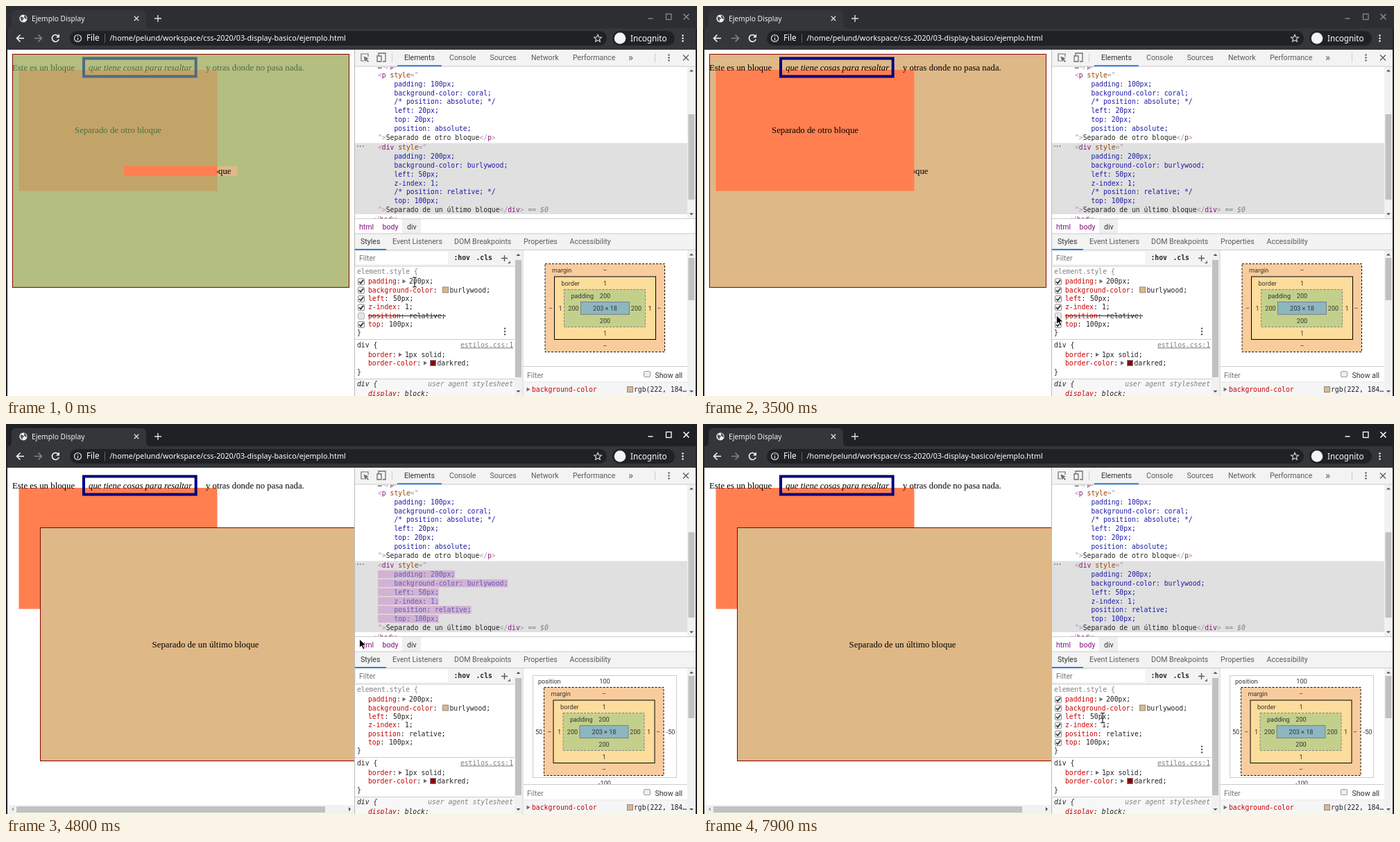
Write an HTML page that moves like this. It is 996x562 px and loops after 8 s.

```html
<!DOCTYPE html>
<html lang="es">
<head>
<meta charset="utf-8">
<title>Ejemplo Display</title>
<style>
html, body { margin: 0; width: 100%; height: 100%; overflow: hidden; background: #fff; }
svg { display: block; width: 100vw; height: 100vh; }
text { white-space: pre; }
.ui { font-family: "Noto Sans", "Open Sans", sans-serif; fill: #fff; }
.page { font: 12.83px "Liberation Serif", serif; fill: #000; }
.tool { font: 10.6px Roboto, sans-serif; fill: #5a5a5a; }
.box { font: 9.1px Roboto, sans-serif; fill: #333; }
.mid { text-anchor: middle; }
.end { text-anchor: end; }
.code { font: 9.72px "DejaVu Sans Mono", monospace; fill: #222; }
.it { font-style: italic; }
.bold { font-weight: bold; }
.tag { fill: #881280; }
.attr { fill: #994500; }
.val { fill: #1a1aa6; }
.dim { fill: #a894a6; }
.grey { fill: #808080; }
.prop { fill: #c80000; }
.line { fill: none; stroke-width: 1.5; }
</style>
</head>
<body>
<svg id="stage" viewBox="0 0 996 562" preserveAspectRatio="none"></svg>
<script>
const text = (x, y, s, cls, extra = '') => `<text x="${x}" y="${y}" class="${cls}" ${extra}>${s}</text>`;
const span = (cls, s) => `<tspan class="${cls}">${s}</tspan>`;
const rect = (x, y, w, h, fill, extra = '') => `<rect x="${x}" y="${y}" width="${w}" height="${h}" fill="${fill}" ${extra}/>`;
const frame = (x, y, w, h, fill, stroke, extra = '') =>
  rect(x + .5, y + .5, w - 1, h - 1, fill, `stroke="${stroke}" ${extra}`);
const line = (d, color, width = 1.5) => `<path class="line" d="${d}" stroke="${color}" style="stroke-width:${width}"/>`;
const shape = (d, fill) => `<path d="${d}" fill="${fill}"/>`;
const group = (id, body) => `<g id="${id}">${body}</g>`;
const dots = (x, y, gap, r, fill) =>
  [-1, 0, 1].map(k => `<circle cx="${x}" cy="${y + k * gap}" r="${r}" fill="${fill}"/>`).join('');
const cross = (x, y, r, color, width) =>
  line(`M${x - r} ${y - r}l${2 * r} ${2 * r}m0 ${-2 * r}l${-2 * r} ${2 * r}`, color, width);
const twisty = (x, y) => shape(`M${x} ${y - 3}l5 3-5 3z`, '#6e6e6e');
const upArrow = (x, y) => shape(`M${x - 3} ${y + 1.5}h6l-3-3z`, '#505050');
const downArrow = (x, y) => shape(`M${x - 3} ${y - 1.5}h6l-3 3z`, '#505050');

// Web page
const block = (x, y) =>
  frame(x, y, 486, 337, 'burlywood', 'darkred') +
  text(x + 161.6, y + 172.5, 'Separado de un último bloque', 'page');
const overlay = (x, y) =>
  `<path fill="rgba(147,196,125,.55)" fill-rule="evenodd"
    d="M${x + 1} ${y + 1}h484v335h-484zM${x + 161} ${y + 161.5}h163.5v14.5h-163.5z"/>`;

const page = () =>
  rect(0, 62, 996, 500, '#fff') +
  group('below', block(9, 69)) +
  rect(18.5, 92, 286, 174.5, 'coral') +
  text(99, 183, 'Separado de otro bloque', 'page') +
  text(9, 93, 'Este es un bloque', 'page') +
  text(119, 93, 'que tiene cosas para resaltar', 'page it') +
  rect(112, 75.5, 161.7, 26, 'none', 'stroke="navy" stroke-width="4"') +
  text(288, 93, 'y otras donde no pasa nada.', 'page') +
  group('overlayBelow', overlay(9, 69)) +
  group('above', block(49, 149) + group('overlayAbove', overlay(49, 149)) +
    rect(2, 549, 500, 13, '#f1f1f1') + rect(15, 551, 445, 9, '#c1c1c1') +
    shape('M11 552v6l-3-3z', '#a3a3a3') + shape('M494 552v6l3-3z', '#505050'));

// Browser window
const header = () =>
  rect(0, 0, 996, 33, '#202124', 'id="titlebar"') +
  shape('M2 32q6 0 6-6V13q0-7 7-7H195q7 0 7 7V26q0 6 6 6z', '#35363a') +
  rect(2, 32, 992, 31, '#35363a') +
  '<circle cx="25" cy="18" r="5.6" fill="#f1f3f4"/>' +
  shape('M21 15l4 1.5 1 2-2 1 0 3-3-3zM26 13l3 2 1 4-3-1-1-2z', '#55575b') +
  text(37, 22.3, 'Ejemplo Display', 'ui', 'font-size="10.25" fill-opacity=".92"') +
  cross(188, 18, 3.2, '#dfe1e5', 1.3) +
  line('M214 18h10m-5-5v10', '#dfe1e5', 1.4) +
  `<g id="buttons">${line('M925.500 18h7', 'currentColor', 1.4)}
    ${rect(951.5, 11.5, 7.5, 8, 'none', 'stroke="currentColor" stroke-width="1.3"')}
    ${cross(980.5, 15.5, 4, 'currentColor', 1.6)}</g>` +
  line('M26 46.500H15.500M20.500 41.500l-5 5 5 5', '#fff') +
  line('M41 46.500H51.500M46.500 41.500l5 5-5 5', '#85878a') +
  line('M75.500 43.500a5 5 0 1 0 .7 4.500', '#fff') + shape('M77 40.500v5h-5z', '#fff') +
  rect(92, 36, 774, 21, '#202124', 'rx="10.5"') +
  '<circle cx="103.500" cy="46.500" r="5" fill="none" stroke="#dfe1e5" stroke-width="1.2"/>' +
  line('M103.500 43.300v1.200m0 1.200v4', '#dfe1e5', 1.2) +
  text(116, 50.4, 'File', 'ui', 'font-size="11.7"') +
  rect(142, 40, 1, 13, '#5f6368') +
  text(149.5, 50.4, '/home/pelund/workspace/css-2020/03-display-basico/ejemplo.html', 'ui', 'font-size="10.75"') +
  line('M853 41.300l1.500 3.500 3.800.3-2.900 2.500.9 3.700-3.300-2-3.300 2 .9-3.700-2.900-2.500 3.800-.3z', '#dfe1e5', 1.1) +
  rect(874, 36, 90, 21, '#202124', 'rx="10.5"') +
  '<circle cx="885" cy="46.500" r="8.300" fill="#f1f3f4"/>' +
  text(900, 50.5, 'Incognito', 'ui', 'font-size="11.7"') +
  dots(975.5, 46.5, 4, 1.2, '#fff') +
  rect(0, 33, 2, 529, '#202124') + rect(994, 33, 2, 529, '#202124');

// Elements panel
const CHAR = 5.85, ROW = 12.8;
const openTag = name => span('dim', '&lt;') + span('tag', name) + span('attr', ' style') + span('dim', '="');
const endTag = name => span('dim', '&lt;/') + span('tag', name) + span('dim', '&gt;');
const closeTag = (label, name) => span('dim', '"&gt;') + label + endTag(name);
const code = (x, y, s, cls = '', extra) => text(x, y, s, 'code ' + cls, extra);
const valueRows = (y, rows) => rows.map((s, i) => code(536, y + i * ROW, '    ' + s, 'val')).join('');
const flashRows = ['padding: 200px;', 'background-color: burlywood;', 'left: 50px;', 'z-index: 1;',
  'position: relative;', 'top: 100px;'];
const staticRows = flashRows.map((s, i) => i === 4 ? `/* ${s} */` : s);

const elements = () =>
  rect(502, 63, 492, 499, '#fff') +
  code(530, 90, ' …' + endTag('p')) +
  code(536, 103, openTag('p')) +
  valueRows(103 + ROW, ['padding: 100px;', 'background-color: coral;', '/* position: absolute; */',
    'left: 20px;', 'top: 20px;', 'position: absolute;']) +
  code(536, 192.8, closeTag('Separado de otro bloque', 'p')) +
  rect(503, 197.5, 479, 102.5, '#e0e0e0') +
  code(504, 205.5, '···', 'grey bold', 'style="letter-spacing:-2px"') +
  code(536, 207.3, openTag('div')) +
  group('codeOff', valueRows(207.3 + ROW, staticRows)) +
  group('codeOn', group('flash', flashRows.map((s, i) =>
    rect(536, 211 + i * ROW, (s.length + 4) * CHAR, 11.3, '#ba55ba')).join('')) +
    group('flashText', valueRows(207.3 + ROW, flashRows))) +
  code(536, 297, closeTag('Separado de un último bloque', 'div') + span('grey it', ' == $0')) +
  code(527, 311, endTag('body')) +
  rect(982, 87, 12, 219, '#f1f1f1') + rect(983.5, 156, 9, 123, '#c1c1c1') +
  upArrow(988, 93) + downArrow(988, 300);

const devBar = () =>
  rect(502, 63, 492, 24, '#f3f3f3') + rect(502, 86.5, 492, 1, '#ccc') +
  line('M516 79h-4V69h10v4', '#6e6e6e', 1.2) + shape('M515.500 72.500l7.500 3-3 1.200 3 3-1.200 1.200-3-3-1.300 3z', '#6e6e6e') +
  line('M537 71V68h10V80h-4M535 72h6v8h-6z', '#6e6e6e', 1.3) +
  rect(556, 68, 1, 13, '#ccc') +
  text(574, 78, 'Elements', 'tool', 'style="fill:#333"') + rect(564, 85.3, 64, 1.8, '#1a73e8') +
  [[639, 'Console'], [697.5, 'Sources'], [757, 'Network'], [817, 'Performance']]
    .map(([x, s]) => text(x, 78, s, 'tool')).join('') +
  text(897, 78.5, '»', 'tool', 'style="font-size:15px"') +
  rect(935, 68, 1, 13, '#ccc') + dots(955.5, 74.5, 4, 1.2, '#5a5a5a') + cross(980, 74.5, 4, '#5a5a5a', 1.3);

// Styles panel
const row = i => 400.3 + i * 12.35;
const decl = (x, y, name, vx, value) => code(x, y, span('prop', name) + ':') + code(vx, y, value);
const swatch = (x, y, fill) => frame(x, y, 9, 9, fill, '#8a8a8a');
const checkbox = (i, on) => frame(507, row(i) - 8, 10, 10, on ? '#f4f4f4' : '#e6e6e6', on ? '#8a8a8a' : '#b0b0b0', 'rx="1.5"') +
  (on ? line(`M509 ${row(i) - 3}l2.200 2.300 4-5`, '#333', 1.7) : '');

const styles = () =>
  rect(503, 306, 491, 22, '#fff') + rect(502, 306, 492, 1, '#ccc') +
  rect(571, 307, 27, 21, '#efefef') +
  text(509, 321.5, 'html', 'tool', 'style="fill:#881280"') +
  text(542.5, 321.5, 'body', 'tool', 'style="fill:#881280"') +
  text(578, 321.5, 'div', 'tool', 'style="fill:#333"') +
  rect(502, 328, 492, 24, '#f3f3f3') + rect(502, 327.5, 492, 1, '#ccc') + rect(502, 351, 492, 1, '#ccc') +
  text(511, 343, 'Styles', 'tool', 'style="fill:#333"') + rect(503, 350, 45, 1.8, '#1a73e8') +
  [[557, 'Event Listeners'], [646, 'DOM Breakpoints'], [746, 'Properties'], [812.5, 'Accessibility']]
    .map(([x, s]) => text(x, 343, s, 'tool')).join('') +
  rect(503, 352, 230, 23, '#f3f3f3') + rect(505, 354, 132, 18, '#fff') + rect(503, 374.5, 230, 1, '#ccc') +
  text(509, 367, 'Filter', 'tool', 'style="fill:#757575"') +
  code(645.5, 366.3, ':hov', 'bold') + code(677.5, 366.3, '.cls', 'bold') +
  line('M714 363.500h9m-4.500-4.500v9', '#5a5a5a', 1.4) + shape('M727 367v4h-4z', '#6e6e6e') +
  code(506, 386, 'element.style {', 'grey') +
  decl(522, row(0), 'padding', 581, '200px;') + twisty(571.5, 396.8) +
  decl(522, row(1), 'background-color', 639.5, 'burlywood;') + swatch(629, 404.5, 'burlywood') +
  decl(522, row(2), 'left', 558, '50px;') +
  decl(522, row(3), 'z-index', 575, '1;') +
  decl(522, row(4), 'position', 581, 'relative;') +
  group('strike', rect(522, 446, 112, 1, '#222')) +
  decl(522, row(5), 'top', 552, '100px;') +
  code(506, 474, '}') +
  group('hover', [0, 1, 2, 3, 5].map(i => checkbox(i, true)).join('') +
    group('boxOff', checkbox(4, false)) + group('boxOn', checkbox(4, true)) + dots(719, 469, 4.3, 1.2, '#5a5a5a')) +
  rect(503, 480, 230, 1, '#ccc') +
  code(506, 491.5, 'div {') + code(731, 491.5, 'estilos.css:1', 'grey end', 'text-decoration="underline"') +
  decl(522, 506, 'border', 575, '1px solid;') + twisty(566, 502.5) +
  decl(522, 518, 'border-color', 621.5, 'darkred;') + twisty(602, 514.5) + swatch(611, 510, 'darkred') +
  code(506, 530.5, '}') +
  rect(503, 537, 230, 25, '#f7f7f7') + rect(503, 537, 230, 1, '#ccc') +
  code(506, 548, 'div {', 'it') + code(731, 548, 'user agent stylesheet', 'grey it end') +
  code(522, 562.3, span('prop', 'display') + ': block;', 'it') +
  rect(733, 352, 11, 210, '#f1f1f1') + rect(734, 366, 9, 169, '#c1c1c1') +
  upArrow(738.5, 358.5) + downArrow(738.5, 555.5) + rect(744.5, 352, 1, 210, '#ccc');

// Box model
const label = (x, y, s, cls = 'mid') => text(x, y, s, 'box ' + cls);
const nested = [
  ['margin', '–', 776.5, 371, 173.5, 128, '#f9cc9d', '#111', 'stroke-dasharray="3 2"'],
  ['border', '1', 790, 389.5, 147, 91.5, '#fddd9b', '#000', ''],
  ['padding', '200', 804, 408, 118, 55, '#c3d08b', '#808080', 'stroke-dasharray="3 2"']
];
const boxModel = () => nested.map(([name, value, x, y, w, h, ...paint], i) =>
    frame(x, y, w, h, ...paint) + label(x + 10.5, y + 13, name, '') +
    label(863.5, y + 13, value) + label(863.5, y + h - 6, value) +
    label([785, 799, 818][i], 439, value) + label([941.5, 928, 908.5][i], 439, value)).join('') +
  frame(828, 426, 71, 19, '#8cb6c0', '#808080') + label(863.5, 439, '203 × 18');

const metrics = () =>
  group('boxStatic', boxModel()) +
  group('boxRelative', frame(759, 362, 208, 148, '#fff', '#ccc') +
    `<g transform="translate(-1.5 8)">${boxModel()}</g>` +
    label(767, 374.3, 'position', '') + label(863, 374.3, '100') +
    label(768, 447, '50') + label(958, 447, '-50') + label(863, 520.5, '-100')) +
  rect(746, 519, 236, 43, '#fff') + rect(746, 519, 236, 1, '#ccc') + rect(746, 541.5, 236, 1, '#ddd') +
  rect(746, 542.5, 236, 20, '#f5f5f5') +
  text(751, 535.5, 'Filter', 'tool', 'style="fill:#757575"') +
  frame(919, 526, 10, 9, '#eee', '#9a9a9a', 'rx="1.5"') +
  text(935.5, 535.5, 'Show all', 'tool', 'style="fill:#333"') +
  twisty(750.5, 552.5) + code(758, 556, 'background-color', 'prop') +
  swatch(895, 548, 'burlywood') + code(905, 556, 'rgb(222, 184…') +
  rect(982, 352, 12, 210, '#f1f1f1') + rect(983.5, 363, 9, 61, '#c1c1c1') +
  upArrow(988, 358) + downArrow(988, 555.5) + rect(502, 63, 1, 499, '#bbb');

const beam = 'M-3-7h2l1 1 1-1h2M0-6V6M-3 7h2l1-1 1 1h2M-1.500 1h3';
const pointers = () => group('pointer',
  group('beam', line(beam, '#fff', 2.4) + line(beam, '#111', 1.1)) +
  group('arrow', '<path d="M0 0V12.500l3-2.700 2.200 5 2.200-1-2.200-4.800h4.300z" fill="#000" stroke="#fff" stroke-width=".9"/>') +
  group('hand', '<path d="M-4.500-5q2-1 3 1l1 2.500q3-1.500 5.500 0 2 1 2 4v4h-7l-5-5q0-2 2-1.500l.5.300z" fill="#000" stroke="#fff" stroke-width=".9"/>'));

const stage = document.getElementById('stage');
stage.innerHTML = page() + elements() + devBar() + styles() + metrics() + header() + pointers();
const $ = id => document.getElementById(id);
const show = (id, on) => { $(id).style.display = on ? '' : 'none'; };

// Pointer stops: time, x, y
const stops = [
  [0, 589, 398], [500, 589, 398], [700, 564, 414], [1300, 563.5, 423], [1600, 563.5, 423],
  [2400, 526, 446], [2900, 526, 446], [3100, 513.5, 446], [3200, 513.5, 446], [3500, 509.5, 446],
  [4500, 509.5, 446], [4700, 511, 370], [4900, 508, 250], [5100, 503, 186], [5300, 494, 3], [5400, 485, 110],
  [5700, 140, 200], [6000, 401, 424], [6300, 280, 403], [6500, 421, 419], [6700, 421, 419],
  [7100, 591.5, 414], [7200, 591.5, 414], [7500, 591.5, 415], [7600, 591.5, 415], [7900, 576, 423.5], [8000, 576, 423.5]
];
const mix = (a, b, k) => a + (b - a) * k;
function pointerAt(t) {
  const i = stops.findIndex(s => s[0] > t);
  const [t0, x0, y0] = stops[i - 1], [t1, x1, y1] = stops[i];
  const k = (t - t0) / (t1 - t0);
  return [mix(x0, x1, k), mix(y0, y1, k)];
}

function draw(t) {
  const active = t >= 3700, relative = t >= 3800;
  $('titlebar').setAttribute('fill', active ? '#202124' : '#2d2e31');
  $('buttons').style.color = active ? '#fff' : '#85878a';
  for (const id of ['below', 'codeOff', 'strike', 'boxOff', 'boxStatic']) show(id, !relative);
  for (const id of ['above', 'codeOn', 'boxOn', 'boxRelative']) show(id, relative);
  show('overlayBelow', t < 600);
  show('overlayAbove', t >= 4900 && t < 5200);
  show('hover', t < 4700 || t >= 6900);

  const glow = Math.max(0, Math.min(1, (5300 - t) / 1400));
  $('flash').style.opacity = glow * .9;
  const ink = `rgb(${mix(26, 225, glow)},${mix(26, 210, glow)},${mix(166, 225, glow)})`;
  for (const el of $('flashText').children) el.style.fill = ink;

  const isBeam = t < 3000 || t >= 7000, isHand = t >= 5000 && t < 5200;
  show('beam', isBeam);
  show('hand', isHand);
  show('arrow', !isBeam && !isHand);
  $('pointer').setAttribute('transform', `translate(${pointerAt(t)})`);
}

const start = performance.now();
function tick() {
  const t = (performance.now() - start) % 8000;
  draw(Math.floor(t / 100) * 100);
  requestAnimationFrame(tick);
}
tick();
</script>
</body>
</html>
```
